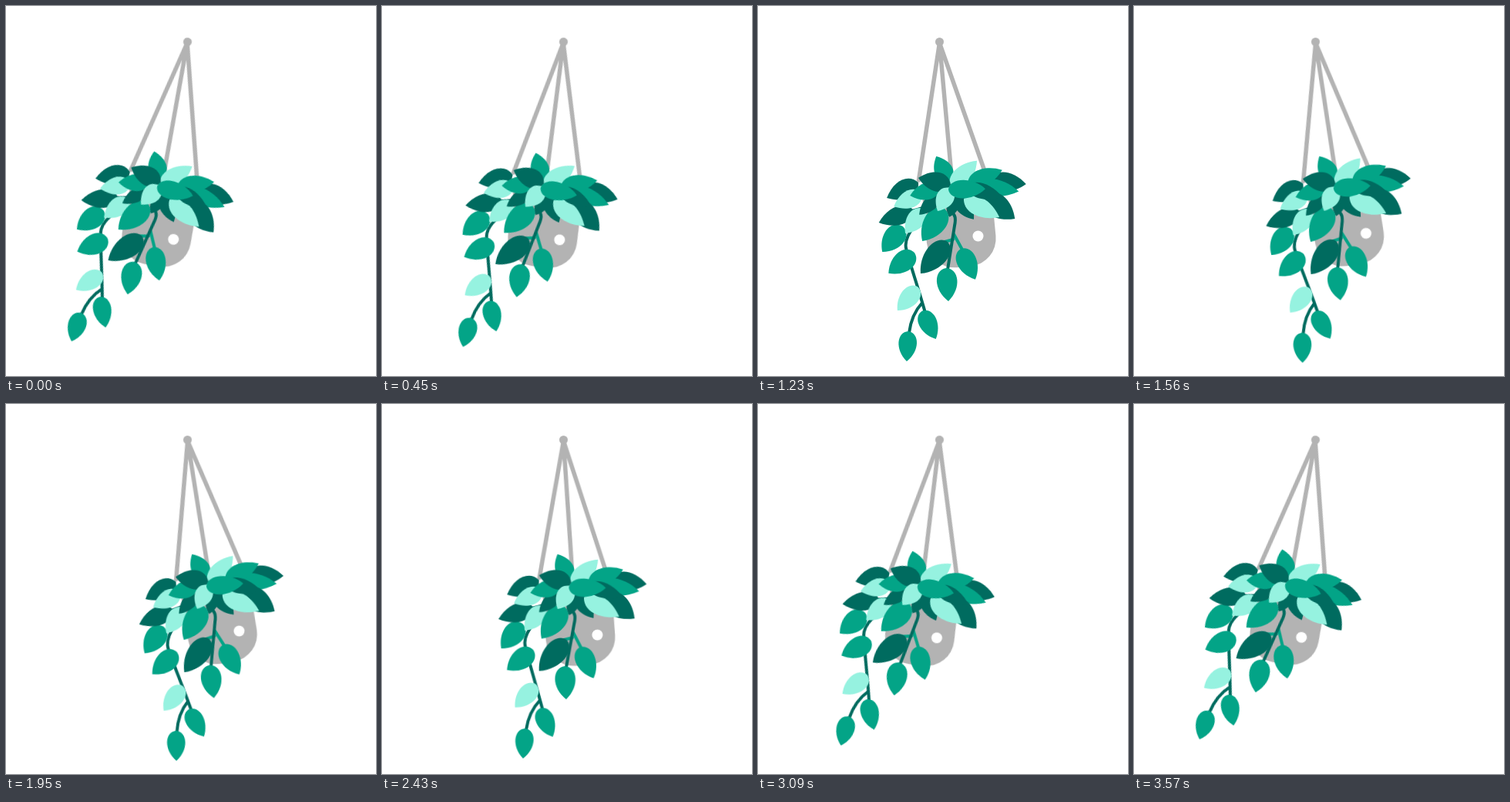
An HTML page without scripts for the animation above (3660 ms loop, 480 by 480 pixels).

```html
<!DOCTYPE html>
<html lang="en">
<head>
<meta charset="utf-8">
<title>Swinging plant</title>
<style>
  html, body { margin: 0; width: 100%; height: 100%; overflow: hidden; background: #fff; }
  svg { display: block; width: 100%; height: 100%; }
  .swing { transform-origin: 235.5px 46.5px; animation: swing 3660ms infinite cubic-bezier(.364, 0, .636, 1); }
  /* out and back takes 3570 ms, then a 90 ms rest */
  @keyframes swing {
    0%, 97.54%, 100% { transform: rotate(15.3deg); }
    48.77% { transform: rotate(-4.3deg); }
  }
  .grey { fill: #b3b3b3; }
  .mid { fill: #03a487; }
  .dark { fill: #006b5f; }
  .light { fill: #96f2e0; }
  .ropes, .stems { fill: none; stroke-linecap: round; stroke-linejoin: round; }
  .ropes { stroke: #b3b3b3; stroke-width: 5.5; }
  .stems { stroke: #006b5f; stroke-width: 4; }
  .stems .young { stroke: #03a487; }
</style>
</head>
<body>
<svg viewBox="0 0 480 480">
  <defs>
    <!-- unit leaves: stalk at 0,0 and tip at 1,0 -->
    <path id="drop" d="M0 0C.04-.62 .63-.69 1 0C.63 .69 .04 .62 0 0Z"/>
    <path id="blade" d="M0 0C.14-.67 .62-.66 1 0C.62 .66 .14 .67 0 0Z"/>
  </defs>
  <g class="swing">
    <path class="ropes" d="M208.500 226L235.500 48L250.500 214M235.500 48L294 214"/>
    <circle class="grey" cx="235.500" cy="46.500" r="5.500"/>
    <path class="grey" transform="rotate(-5.500 235.500 46.500)" d="M194 235H284V304a36 36 0 0 1-36 36H230a36 36 0 0 1-36-36Z"/>
    <circle cx="285.500" cy="298.500" r="7" fill="#fff"/>

    <g class="stems">
      <path d="M214 262L196 267M206 280C196 294 190 304 192 314C195 328 208 366 217 398M213 385C203 396 198 408 196 424"/>
      <path class="young" d="M238 307L253 303M254 296L266 318"/>
      <path d="M250 266C256 271 257 275 255 285L246 342"/>
    </g>

    <!-- trailing leaves -->
    <use href="#drop" class="mid" transform="translate(195 422) rotate(93) scale(39 24)"/>
    <use href="#drop" class="mid" transform="translate(213 395.500) rotate(64) scale(40.500 24)"/>
    <use href="#drop" class="light" transform="translate(208 365) rotate(132) scale(40.500 24)"/>
    <use href="#drop" class="mid" transform="translate(203 320) rotate(141.500) scale(43 27)"/>
    <use href="#drop" class="mid" transform="translate(188 286) rotate(129) scale(42.500 28)"/>
    <use href="#drop" class="mid" transform="translate(244 340) rotate(86) scale(43 27)"/>
    <use href="#drop" class="mid" transform="translate(263 315) rotate(64.500) scale(44 26)"/>
    <use href="#drop" class="dark" transform="translate(246 306) rotate(130.500) scale(54 29)"/>

    <!-- crown, back to front -->
    <use href="#blade" class="dark" transform="translate(208 229) rotate(154) scale(45.500 25)"/>
    <use href="#blade" class="dark" transform="translate(202 265) rotate(160.500) scale(48 24)"/>
    <use href="#blade" class="light" transform="translate(216 263) rotate(128) scale(40.500 24)"/>
    <use href="#blade" class="light" transform="translate(213 243) rotate(155) scale(40.500 23)"/>
    <use href="#blade" class="dark" transform="translate(256 248) rotate(107) scale(27 16)"/>
    <use href="#drop" class="mid" transform="translate(242 263) rotate(124.500) scale(51 30)"/>
    <use href="#blade" class="dark" transform="translate(256 246) rotate(52) scale(39 20)"/>
    <use href="#blade" class="dark" transform="translate(236 244) rotate(135) scale(38 18)"/>
    <use href="#blade" class="mid" transform="translate(248 228) rotate(243) scale(37 24)"/>
    <use href="#blade" class="light" transform="translate(250 236) rotate(314) scale(49 24)"/>
    <use href="#blade" class="dark" transform="translate(300 226) rotate(6) scale(48 25)"/>
    <use href="#blade" class="mid" transform="translate(284 232) rotate(9) scale(55 22)"/>
    <use href="#blade" class="dark" transform="translate(292 246) rotate(36) scale(51 30)"/>
    <use href="#blade" class="light" transform="translate(267 250) rotate(27.500) scale(52 24)"/>
    <use href="#blade" class="mid" transform="translate(272 230) rotate(339) scale(48 22)"/>
    <use href="#blade" class="dark" transform="translate(270 234) rotate(16.500) scale(49 20)"/>
    <use href="#blade" class="mid" transform="translate(236 236) rotate(165.500) scale(40 22)"/>
    <use href="#blade" class="dark" transform="translate(250 232) rotate(192) scale(43 25)"/>
    <use href="#blade" class="light" transform="translate(250 236) rotate(119.500) scale(34.500 23)"/>
    <use href="#drop" class="mid" transform="translate(247 238) rotate(359) scale(48 24)"/>
  </g>
</svg>
</body>
</html>
```
